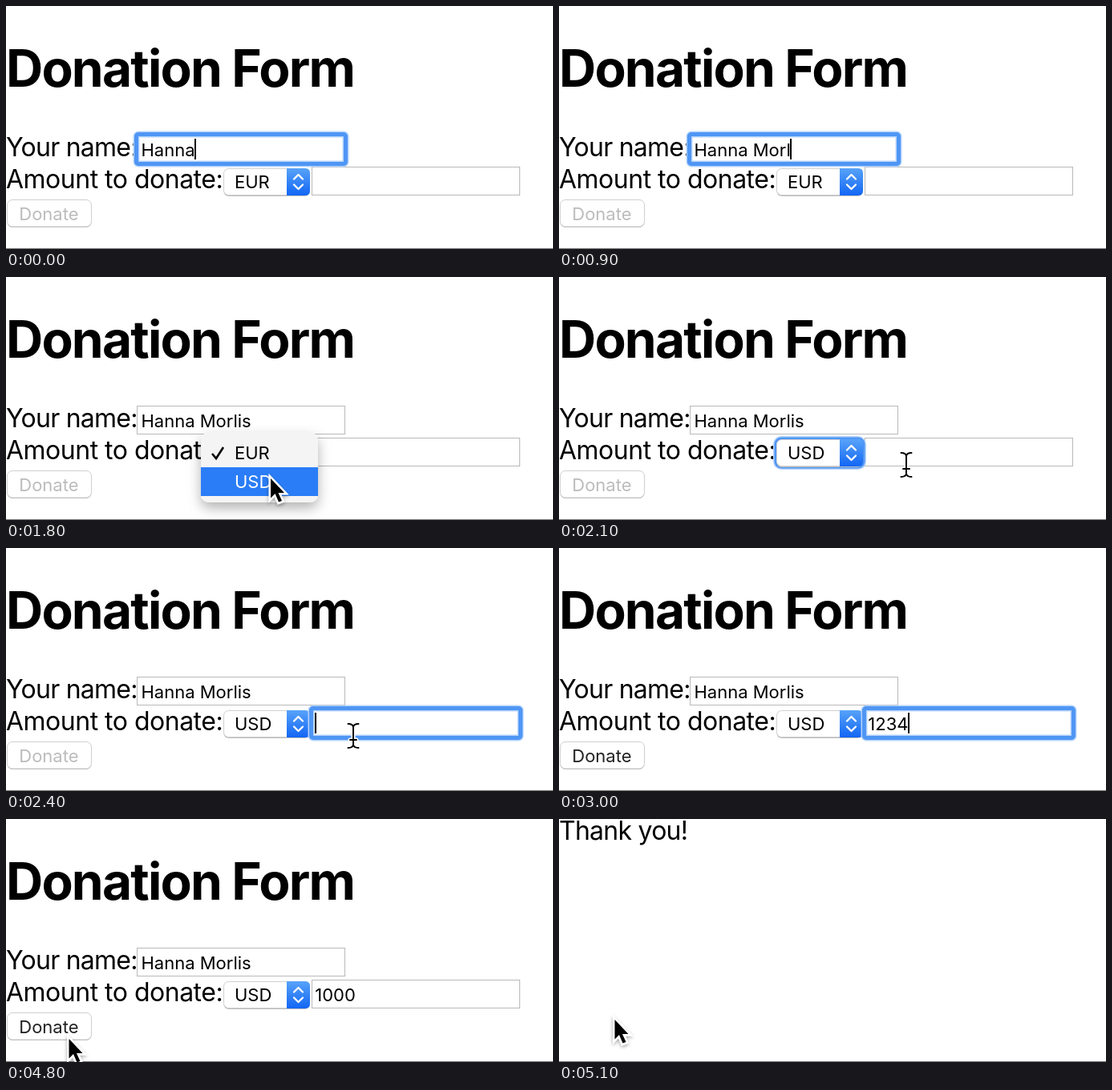
An HTML page that plays this animation: 682 px wide and 304 px high, repeating every 6 s.

```html
<!DOCTYPE html>
<html lang="en">
<head>
<meta charset="utf-8">
<title>Donation Form</title>
<style>
html, body { margin: 0; width: 100%; height: 100%; overflow: hidden; background: #fff; }
svg { display: block; }
text {
  font: 22px Inter, "Liberation Sans", sans-serif;
  font-optical-sizing: none;
  white-space: pre;
}
.body { font-size: 32px; letter-spacing: -.75px; }
.long { letter-spacing: -.5px; }
.title { font-size: 64px; font-weight: 700; letter-spacing: -1.8px; }
.field { fill: #fff; stroke: #b9b9b9; }
.ring rect { fill: none; stroke: #b5d3fb; stroke-width: 8; }
.ring rect + rect { stroke: #4f96f4; stroke-width: 5; }
</style>
</head>
<body>
<svg width="682" height="304" viewBox="0 0 682 304">
  <defs>
    <linearGradient id="blue" x2="0" y2="1">
      <stop stop-color="#58a3f9"/><stop offset="1" stop-color="#1266f4"/>
    </linearGradient>
    <filter id="soft" x="-50%" y="-50%" width="200%" height="200%">
      <feDropShadow dx="0" dy="2" stdDeviation="2" flood-opacity=".35"/>
    </filter>
    <filter id="deep" x="-30%" y="-30%" width="160%" height="180%">
      <feDropShadow dx="0" dy="7" stdDeviation="8" flood-opacity=".3"/>
    </filter>
    <path id="beamShape"
      d="M426.5 220q6 0 6.5 4q.5-4 6.5-4M433 224V246M426.5 250q6 0 6.5-4q.5 4 6.5 4M429 240h8"/>
  </defs>

  <g id="form">
    <text class="title" x="0" y="101">Donation Form</text>
    <text class="body" x="0" y="188">Your name:</text>
    <text class="body long" x="0" y="228">Amount to donate:</text>

    <rect class="field" x="163.5" y="161.5" width="259" height="35"/>
    <rect class="field" x="381.5" y="201.5" width="259" height="35"/>

    <g id="currencyRing" class="ring">
      <rect x="271" y="203" width="108" height="34" rx="6"/>
      <rect x="271" y="203" width="108" height="34" rx="6"/>
    </g>
    <rect x="271.5" y="204" width="107" height="34" rx="6" fill="#bdbdbd"/>
    <rect x="271.5" y="203.5" width="107" height="33" rx="6" fill="#fff" stroke="#d0d0d0"/>
    <path d="M350 203h23q6 0 6 6v22q0 6-6 6h-23z" fill="url(#blue)"/>
    <path d="M359 216.5l5.5-5.5 5.5 5.5M359 223.5l5.5 5.5 5.5-5.5" fill="none" stroke="#fff"
      stroke-width="2.3" stroke-linecap="round" stroke-linejoin="round"/>
    <text id="currency" x="285" y="228"></text>

    <rect x="1.5" y="243.5" width="105" height="33.5" rx="6.5" fill="#b8b8b8"/>
    <rect x="1.5" y="242.5" width="105" height="33.5" rx="6.5" fill="#fff" stroke="#cfcfcf"/>
    <text id="button" x="16.3" y="268">Donate</text>

    <g id="nameRing" class="ring">
      <rect x="162.5" y="160.5" width="261" height="37" rx="2.5"/>
      <rect x="162.5" y="160.5" width="261" height="37" rx="2.5"/>
    </g>
    <g id="amountRing" class="ring">
      <rect x="380.5" y="200.5" width="261" height="37" rx="2.5"/>
      <rect x="380.5" y="200.5" width="261" height="37" rx="2.5"/>
    </g>
    <text id="name" x="168.5" y="188"></text>
    <text id="amount" x="385.3" y="228"></text>
    <rect id="caret" width="2" height="26"/>

    <g id="menu">
      <rect x="243" y="194" width="146" height="88" rx="10" fill="#f4f4f4" filter="url(#deep)"/>
      <rect x="243" y="238" width="146" height="36" fill="#2a7df6"/>
      <path d="M257 221l5 6 9-14" fill="none" stroke="#000" stroke-width="2.6"/>
      <text x="285" y="228">EUR</text>
      <text x="285" y="264" fill="#fff">USD</text>
    </g>
  </g>

  <text id="thanks" class="body" x="0" y="26">Thank you!</text>
  <path d="M0 303.5H682" stroke="#747474"/>

  <path id="arrow" d="M0 0V24.5L5.5 19 10 29.5 14 28 9.5 18H17Z" stroke="#fff" stroke-width="5"
    paint-order="stroke" filter="url(#soft)"/>
  <g id="beam" fill="none" stroke-linecap="round">
    <use href="#beamShape" stroke="#fff" stroke-width="5"/>
    <use href="#beamShape" stroke="#000" stroke-width="2"/>
  </g>
</svg>
<script>
const $ = id => document.getElementById(id);
const show = (id, on) => $(id).setAttribute('display', on ? 'inline' : 'none');

const STEP = 300, LOOP = 6000, DONE = 17;
const fullName = 'Hanna Morlis';
const typedName = [5, 6, 8, 10, 12];
const typedAmount = { 9: '12', 10: '1234', 11: '12', 12: '1', 13: '10', 14: '1000' };
const pointer = { 5: [338.5, 213], 6: [330, 252], 15: [152.5, 275], 16: [78.5, 275], 17: [69.5, 251] };

function focusAt(i) {
  if (i < 6) return 'name';
  if (i < 8) return 'currency';
  return i < 16 ? 'amount' : '';
}

function draw(i) {
  const focus = focusAt(i);
  show('form', i < DONE);
  show('thanks', i === DONE);
  for (const id of ['name', 'currency', 'amount']) show(id + 'Ring', focus === id);

  $('name').textContent = fullName.slice(0, typedName[i] ?? fullName.length);
  $('amount').textContent = typedAmount[Math.min(i, 14)] ?? '';
  $('currency').textContent = i < 7 ? 'EUR' : 'USD';
  $('button').setAttribute('fill', i < 9 ? '#bcbcbc' : '#222');
  show('menu', i === 6);

  const typing = focus === 'name' || focus === 'amount';
  show('caret', typing && i !== 4);
  if (typing) {
    const field = $(focus);
    const end = +field.getAttribute('x') + field.getComputedTextLength();
    $('caret').setAttribute('x', Math.round(end - .5));
    $('caret').setAttribute('y', field.getAttribute('y') - 22);
  }

  show('arrow', pointer[i]);
  if (pointer[i]) $('arrow').setAttribute('transform', `translate(${pointer[i]})`);
  show('beam', i === 7 || i === 8);
}

const start = performance.now();
function tick() {
  const t = (performance.now() - start) % LOOP;
  draw(Math.min(DONE, Math.floor(t / STEP)));
  requestAnimationFrame(tick);
}
tick();
</script>
</body>
</html>
```
